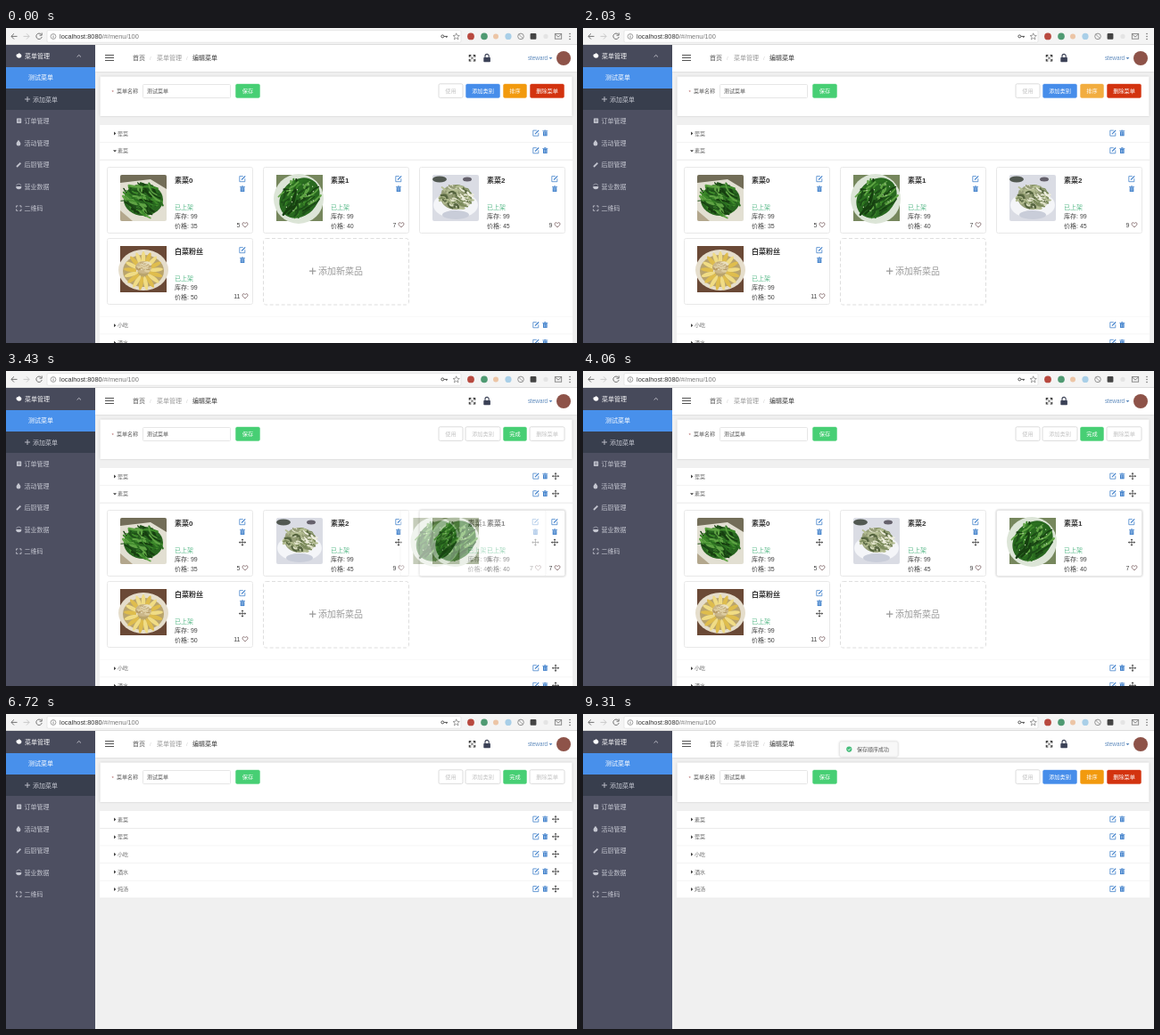
An HTML page that plays this animation: 640x354 px, repeating every 9.38 s.

```html
<!DOCTYPE html>
<html>
<head>
<meta charset="utf-8">
<title>Menu editor</title>
<style>
html, body { margin: 0; width: 100%; height: 100%; overflow: hidden; background: #f0f0f0; }
svg { display: block; }
#stage { width: 100%; height: 100%; }
text { font-family: "Liberation Sans", "Noto Sans CJK SC", "Noto Sans CJK", sans-serif; white-space: pre; }
.lifted { filter: drop-shadow(0 .7px 1.3px rgba(0,0,0,.25)); }
.soft { filter: drop-shadow(0 .5px 1px rgba(0,0,0,.16)); }
</style>
</head>
<body>
<svg id="stage" viewBox="0 0 640 354"></svg>
<script>
const LOOP = 9380;
const ROW_TOP = 109, ROW_H = 19.6, BODY_TOP = 148.2, BODY_H = 176.4;
const TIME = {
  sortHover: 1850, sortOn: 2240, cardHover: 2620, cardGrab: 2760, cardSwap: 3250, cardDrop: 3600, cardLeave: 4500,
  rowGrab: 5472, rowSwap: 5900, rowDrop: 6200, doneHover: 7450, sortOff: 8000, hoverEnd: 8350
};
const BLUE = '#3a7cc9', INK = '#444';

// Markup helpers; text is placed by its vertical centre.
const text = (x, cy, s, size = 6, fill = '#555', attrs = '') =>
  `<text x="${x}" y="${cy + size * .37}" font-size="${size}" fill="${fill}" ${attrs}>${s}</text>`;
const rect = (x, y, w, h, fill, attrs = '') =>
  `<rect x="${x}" y="${y}" width="${w}" height="${h}" fill="${fill}" ${attrs}/>`;
const circle = (x, y, r, fill, attrs = '') => `<circle cx="${x}" cy="${y}" r="${r}" fill="${fill}" ${attrs}/>`;
const ellipse = (x, y, rx, ry, fill, attrs = '') =>
  `<ellipse cx="${x}" cy="${y}" rx="${rx}" ry="${ry}" fill="${fill}" ${attrs}/>`;
const line = (d, stroke, width = 1, attrs = '') =>
  `<path d="${d}" fill="none" stroke="${stroke}" stroke-width="${width}" ${attrs}/>`;
const shape = (d, fill, attrs = '') => `<path d="${d}" fill="${fill}" ${attrs}/>`;
const at = (x, y, inner, attrs = '') => `<g transform="translate(${x} ${y})" ${attrs}>${inner}</g>`;
const times = (n, make) => Array.from({ length: n }, (_, i) => make(i)).join('');

let seed = 7;
const random = (a = 0, b = 1) => {
  seed = (seed * 16807) % 2147483647;
  return a + (b - a) * seed / 2147483647;
};
const pick = list => list[Math.floor(random(0, list.length))];

const icon = {
  edit: (x, y) => at(x, y, line('M.8-2.9H-3.2V3.2H2.8V-.2', BLUE, .75) + line('M-1 1.1L3.2-3.1', BLUE, 1.1)),
  trash: (x, y) => at(x, y,
    shape('M-2.3-1.6H2.3V3.3H-2.3Z', BLUE) + rect(-3, -2.6, 6, .7, BLUE) + rect(-1.1, -3.3, 2.2, .7, BLUE) +
    line('M-.8-.9V2.5M.8-.9V2.5', '#cfdff2', .6)),
  move: (x, y) => at(x, y,
    line('M-3.4 0H3.4M0-3.4V3.4', INK, .8) +
    shape('M0-4.1L1.4-2.5H-1.4ZM0 4.1L1.4 2.5H-1.4ZM-4.1 0L-2.5-1.4V1.4ZM4.1 0L2.5-1.4V1.4Z', INK), 'class="sorting"'),
  heart: (x, y) => at(x, y, line('M0 2.7C-1.5 1.5-3 .4-3-1C-3-2.9-.7-3.1 0-1.5C.7-3.1 3-2.9 3-1C3 .4 1.5 1.5 0 2.7Z', '#75595a', .75)),
  expand: (x, y, r, color, w) => at(x, y, line(
    `M${-r} ${-r / 3}V${-r}H${-r / 3}M${r / 3} ${-r}H${r}V${-r / 3}M${r} ${r / 3}V${r}H${r / 3}M${-r / 3} ${r}H${-r}V${r / 3}`, color, w))
};

// Food pictures, each on a 52 px square.
const stems = (n, cx, cy, rx, ry, tilt, colors, long = 9) => times(n, () => {
  const a = random(0, 2 * Math.PI), d = Math.sqrt(random());
  const x = cx + Math.cos(a) * d * rx, y = cy + Math.sin(a) * d * ry;
  const turn = tilt + random(-30, 30), len = random(long / 3, long);
  return line(`M${-len} 0Q0 ${random(-5, 5)} ${len} 0`, pick(colors), random(1, 2.6),
    `stroke-linecap="round" transform="translate(${x} ${y}) rotate(${turn})"`);
});
const greens = ['#1d4f18', '#2b7020', '#3d8a2a', '#5fa444', '#163f10'];
const pale = ['#dfe2c8', '#b4bd92', '#7d8c5c', '#eeeede', '#56653f', '#969d78'];
const photos = [
  rect(0, 0, 52, 52, '#e2dfd2') + shape('M0 0H52V16L34 5L0 9Z', '#726d58') + shape('M0 40L14 52H0Z', '#b3a78d') +
    ellipse(26, 28, 22, 18, '#28651f') + stems(75, 25, 28, 19, 17, 35, greens),
  rect(0, 0, 52, 52, '#76875d') + circle(25, 27, 28, '#dce5d7') +
    ellipse(26, 26, 25, 20, '#28681f', 'transform="rotate(-45 26 26)"') + stems(70, 26, 26, 18, 18, -50, greens) +
    times(16, () => circle(random(10, 42), random(10, 42), .7, '#c5ddb0')),
  rect(0, 0, 52, 52, '#dadce4') + ellipse(8, 5, 8, 3.5, '#515851') + ellipse(39, 5, 5, 2.5, '#65616c') +
    ellipse(26, 34, 25, 15, '#f4f5f8') + ellipse(26, 45, 15, 5, '#c9cdd9') + ellipse(26, 25, 17, 14, '#969f78') +
    stems(85, 26, 25, 17, 13, 20, pale, 4.5),
  rect(0, 0, 52, 52, '#6a4936') + ellipse(26, 27, 28, 23, '#e5ddcb') + ellipse(26, 28, 23, 18, '#b9a46c') +
    times(17, i => ellipse(26, 14, 2.3, 8, i % 2 ? '#dfbd4d' : '#f0dc85', `transform="rotate(${i * 360 / 17} 26 28)"`)) +
    ellipse(26, 24, 9, 7, '#cbb78a') + stems(14, 26, 24, 7, 5, 0, ['#e9dfc0', '#b69b66', '#ddcda2'], 4)
];

const dishes = [
  { name: '素菜0', price: 35, likes: 5, x: 113, y: 156 },
  { name: '素菜1', price: 40, likes: 7, x: 288, y: 156 },
  { name: '素菜2', price: 45, likes: 9, x: 463, y: 156 },
  { name: '白菜粉丝', price: 50, likes: 11, x: 113, y: 236 }
];
const cardMarkup = (dish, i) =>
  rect(.5, .5, 163, 74, '#fff', 'class="frame" rx="2" stroke="#e6e6e6" stroke-width=".9"') +
  `<svg x="15" y="9" width="52" height="52" style="clip-path:inset(0 round 2px)">${photos[i]}</svg>` +
  text(76, 14.8, dish.name, 8, '#333', 'font-weight="600"') +
  text(76, 45.3, '已上架', 7, '#5dbb8c') +
  text(76, 55.8, '库存: 99', 7, INK) +
  text(76, 66.2, '价格: ' + dish.price, 7, INK) +
  text(149.5, 65.2, dish.likes, 7, INK, 'text-anchor="end"') +
  icon.heart(155, 65.2) + icon.edit(152, 13.5) + icon.trash(152, 24.8) + icon.move(152, 36.6);

const rowMarkup = name =>
  rect(105, 0, 530, ROW_H, '#fff') + line(`M105 ${ROW_H}H635`, '#e4e4e4', .7) +
  shape('M-1-2L1.4 0L-1 2Z', '#444', 'class="caret" transform="translate(122 9.6)"') +
  text(125, 9.6, name, 6, '#666') + icon.edit(594, 9) + icon.trash(604.3, 9) + icon.move(616, 9.2);

const button = (x, w, label, fill, id = '') => {
  const frame = fill
    ? rect(x, 63, w, 15.4, fill, `rx="1.6" stroke="${fill}" stroke-opacity=".4" ${id && `id="${id}"`}`)
    : rect(x, 62.8, w, 15.6, '#fff', 'rx="1.6" stroke="#d8d8d8" stroke-width=".9"');
  return frame + text(x + w / 2, 70.7, label, 6.2, fill ? '#fff' : '#c3c3c3', 'text-anchor="middle"');
};

const toolbar = rect(0, 0, 640, 19, '#f4f4f4') + rect(0, 18.3, 640, .7, '#d4d4d4') +
  rect(46, 2.6, 464, 13.6, '#fff', 'rx="1.5" stroke="#dedede" stroke-width=".7"') +
  line('M12.5 9.4H6M9 6.3L5.9 9.4L9 12.5', '#666', .9) +
  line('M19.5 9.4H26M23 6.3L26.1 9.4L23 12.5', '#c4c4c4', .9) +
  line('M39.6 7.3A3.2 3.2 0 1 0 40.2 10M40.2 5.5V8.2H37.5', '#666', .9) +
  circle(53, 9.5, 2.9, 'none', 'stroke="#777" stroke-width=".7"') + rect(52.6, 9, .8, 2.2, '#777') + rect(52.6, 7.7, .8, .8, '#777') +
  text(60, 9.6, 'localhost:8080<tspan fill="#777">/#/menu/100</tspan>', 7.4, '#333') +
  circle(489.3, 9.4, 1.5, 'none', 'stroke="#555"') + line('M491 9.4H495M493.8 9.4V11', '#555', 1) +
  line('M504.7 5.8L505.7 8.3L508.3 8.5L506.3 10.2L507 12.8L504.7 11.4L502.4 12.8L503.1 10.2L501.1 8.5L503.7 8.3Z', '#777', .7) +
  circle(521, 9.4, 3.9, '#b8493f') + circle(536, 9.4, 3.8, '#4f9a72') + circle(549, 9.4, 3, '#ecc5a6') +
  circle(563, 9.4, 3.6, '#a9cfe8') + circle(577, 9.4, 3.3, 'none', 'stroke="#888" stroke-width=".9"') +
  line('M574.7 7.1L579.3 11.7', '#888', .8) + rect(587.6, 6, 6.8, 6.8, '#444', 'rx="1"') +
  circle(605, 9.4, 2.6, '#e4e4e4') +
  rect(615.3, 6.6, 7.4, 5.6, '#eee', 'stroke="#777" stroke-width=".8"') + line('M615.3 6.8L619 10L622.7 6.8', '#777', .8) +
  times(3, i => circle(632, 6.4 + i * 3, .75, '#666'));

const MUTED = '#c4c6d0';
const sidebar = rect(0, 19, 100, 335, '#4d4f61') + rect(0, 19, 100, 25, '#474a5b') +
  rect(0, 44, 100, 24, '#4890eb') + rect(0, 68, 100, 24, '#383e4d') +
  shape('M11.5 31C11.5 28.5 14 30 14.5 28C16 29 17.6 29.5 17.4 31.5C17 34.5 12 34.5 11.5 31Z', '#fff') +
  text(21, 31.2, '菜单管理', 7, '#f4f4f6', 'font-weight="500"') + line('M79.6 32.5L81.8 30.4L84 32.5', '#d5d6dd', .8) +
  text(25, 55.8, '测试菜单', 7, '#fff') +
  line('M21 80H27M24 77V83', MUTED, .9) + text(30, 80, '添加菜单', 7, MUTED) +
  rect(12, 101.5, 5.2, 5.4, MUTED, 'rx=".6"') + line('M13 103.3H16.2M13 105H16.2', '#4d4f61', .6) +
  shape('M14 125.8C15.5 128 16.4 129 16.4 130.2A2.4 2.2 0 0 1 11.6 130.2C11.6 129 12.5 128 14 125.8Z', MUTED) +
  line('M12 156L16.4 151.7', MUTED, 1.8) +
  shape('M11.2 178H17.4A3.1 3.2 0 0 1 11.2 178Z', MUTED) + line('M11.5 177A3 3 0 0 1 17 177', MUTED, .6) +
  icon.expand(14.3, 202.6, 2.7, MUTED, .9) +
  ['订单管理', '活动管理', '后厨管理', '营业数据', '二维码'].map((s, i) => text(20.6, 104.4 + i * 24.55, s, 7, MUTED)).join('');

const header = rect(100, 19, 540, 30, '#fff', 'class="soft"') +
  line('M111 30.5H121M111 33.5H121M111 36.5H121', '#555', 1) +
  text(142, 33.6, '首页', 7, '#555') + text(161, 33.6, '/', 6, '#ccc') + text(169, 33.6, '菜单管理', 7, '#999') +
  text(202, 33.6, '/', 6, '#ccc') + text(209, 33.6, '编辑菜单', 7, '#333', 'font-weight="500"') +
  icon.expand(522.5, 33.8, 3.2, '#333', 1.1) + line('M519.8 31.1L525.2 36.5M525.2 31.1L519.8 36.5', '#333', .7) +
  rect(535.3, 33, 7.6, 5.2, '#3c4257', 'rx=".7"') + line('M537 33V31.5A2.1 2.1 0 0 1 541.2 31.5V33', '#3c4257', 1.1) +
  text(607, 34, 'steward', 6.3, '#5f8bbd', 'text-anchor="end"') + shape('M608.6 33H612.4L610.5 35.2Z', '#5f8bbd') +
  circle(625, 34, 8, '#8e5349');

const form = rect(105.5, 54.5, 529, 44.5, '#fff', 'class="soft"') +
  text(118.5, 71.5, '*', 6, '#a55') + text(124, 70.6, '菜单名称', 6, '#555') +
  rect(153.5, 63.5, 98, 15, '#fff', 'stroke="#e0e0e0" stroke-width=".8" rx="1"') + text(158, 70.8, '测试菜单', 6, '#555') +
  button(257.5, 27, '保存', '#47cf74') + button(485, 27, '使用') +
  `<g id="normal">${button(515.5, 38, '添加类别', '#468dea') + button(557.5, 26, '排序', '#f29a0e', 'sort') + button(587.5, 38, '删除菜单', '#d3330f')}</g>` +
  `<g class="sorting">${button(515, 39, '添加类别') + button(557.5, 26, '完成', '#47cf74', 'done') + button(587, 39, '删除菜单')}</g>`;

const addCard = rect(288.5, 236.5, 163, 74.5, '#fff', 'rx="3" stroke="#dedede" stroke-width="1" stroke-dasharray="4 2.5"') +
  line('M340 273.2H347.4M343.7 269.5V276.9', '#999', 1.2) + text(350, 273.3, '添加新菜品', 10, '#999');

const body = `<svg id="body" x="0" y="${BODY_TOP}" width="640" height="${BODY_H}"><g transform="translate(0 ${-BODY_TOP})">` +
  rect(105, BODY_TOP, 530, BODY_H, '#fff') + addCard +
  dishes.map((d, i) => `<g id="card${i}" transform="translate(${d.x} ${d.y})">${cardMarkup(d, i)}</g>`).join('') +
  `<g id="cardGhost" opacity=".42">${cardMarkup(dishes[1], 1)}</g></g></svg>`;

const rows = ['荤菜', '素菜', '小吃', '酒水', '炖汤'];
const toast = rect(287.5, 31, 65.5, 17, '#f8f8f8', 'rx="2" class="soft" stroke="#e4e4e4" stroke-width=".6"') +
  circle(298.3, 39.6, 3.1, '#45bd7b') + line('M296.8 39.7L298 40.9L300 38.5', '#fff', .8) + text(307, 39.7, '保存顺序成功', 6, '#555');

const stage = document.getElementById('stage');
stage.innerHTML = rect(0, 0, 640, 354, '#f0f0f0') + form + body +
  rows.map((name, i) => `<g id="row${i}">${rowMarkup(name)}</g>`).join('') +
  `<g id="rowGhost" class="lifted" opacity=".93">${rowMarkup(rows[0])}</g>` +
  header + sidebar + toolbar + `<g id="toast">${toast}</g>`;

const $ = id => document.getElementById(id);
const sortingParts = [...document.querySelectorAll('.sorting')];
const caret = $('row1').querySelector('.caret');
const cardFrame = $('card1').querySelector('.frame');

const clamp = v => Math.max(0, Math.min(1, v));
const easeInOut = p => p < .5 ? 2 * p * p : 1 - 2 * (1 - p) ** 2;
const within = (t, from, to) => t >= from && t < to;
const show = (el, on) => el.setAttribute('display', on ? 'inline' : 'none');
const place = (el, x, y) => el.setAttribute('transform', `translate(${x} ${y})`);
const paint = (el, color) => ['fill', 'stroke'].forEach(name => el.setAttribute(name, color));
const along = (t, keys) => {
  let value = keys[0][1];
  for (let i = 1; i < keys.length; i++) {
    const [t0, v0] = keys[i - 1], [t1, v1] = keys[i];
    if (t >= t0) value = v0 + (v1 - v0) * clamp((t - t0) / (t1 - t0));
  }
  return value;
};

function update(t) {
  const sorting = within(t, TIME.sortOn, TIME.sortOff);
  sortingParts.forEach(el => show(el, sorting));
  show($('normal'), !sorting);
  const hoverSort = within(t, TIME.sortHover, TIME.sortOn) || within(t, TIME.sortOff, TIME.hoverEnd);
  paint($('sort'), hoverSort ? '#f2ad3f' : '#f29a0e');
  paint($('done'), within(t, TIME.doneHover, TIME.sortOff) ? '#63d889' : '#47cf74');

  const swapped = t >= TIME.cardSwap;
  place($('card1'), swapped ? 463 : 288, 156);
  place($('card2'), swapped ? 288 : 463, 156);
  cardFrame.classList.toggle('lifted', within(t, TIME.cardHover, TIME.cardLeave));
  show($('cardGhost'), within(t, TIME.cardGrab, TIME.cardDrop));
  place($('cardGhost'), 288 + along(t, [[TIME.cardGrab, 4], [3010, 37], [3400, 150], [TIME.cardDrop, 172]]), 156);

  const closing = easeInOut(clamp((t - TIME.rowGrab) / 300));
  const height = BODY_H * (1 - closing);
  $('body').setAttribute('height', height);
  show($('body'), height > 0);
  caret.setAttribute('transform', `translate(122 9.6) rotate(${90 * (1 - closing)})`);

  const order = t < TIME.rowSwap ? [0, 1, 2, 3, 4] : [1, 0, 2, 3, 4];
  order.forEach((row, i) => place($('row' + row), 0, ROW_TOP + i * ROW_H + (i > 1 ? height : 0)));
  show($('rowGhost'), within(t, TIME.rowGrab, TIME.rowDrop));
  place($('rowGhost'), 0, ROW_TOP + along(t, [[TIME.rowGrab, 7], [5530, 10], [6000, 22]]));

  const entry = clamp((t - TIME.sortOff) / 400), eased = 1 - (1 - entry) ** 2;
  show($('toast'), t >= TIME.sortOff);
  $('toast').setAttribute('opacity', eased);
  place($('toast'), 0, -17 * (1 - eased));
}

function tick() {
  update(performance.now() % LOOP);
  requestAnimationFrame(tick);
}
tick();
</script>
</body>
</html>
```
